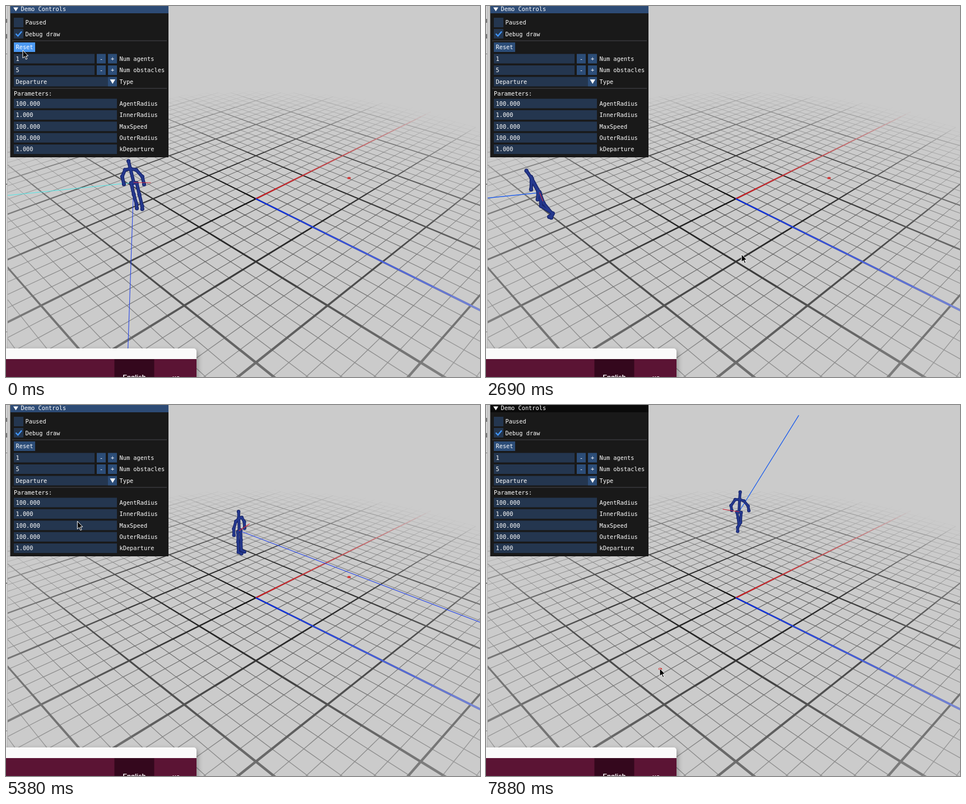
An HTML page with a canvas that plays this animation: 846x662 px, repeating every 8000 ms.

```html
<!DOCTYPE html>
<html lang="en">
<head>
<meta charset="utf-8">
<title>Steering demo</title>
<style>
  html, body { margin: 0; width: 100%; height: 100%; overflow: hidden; background: #cbcbcb; }
  canvas, svg { position: absolute; left: 0; top: 0; display: block; }
  text { font: 10.3px "DejaVu Sans Mono", monospace; fill: #fff; white-space: pre; }
  .site { font: bold 11.4px "Liberation Sans", Arial, sans-serif; }
  .field { fill: #24364f; }
  .btn { fill: #2c4d78; }
  .rule { fill: #48484f; }
</style>
</head>
<body>
<canvas id="floor" width="846" height="662"></canvas>
<canvas id="live" width="846" height="662"></canvas>
<svg width="846" height="662" viewBox="0 0 846 662">
  <defs>
    <filter id="shade" x="-10%" y="-50%" width="120%" height="200%">
      <feGaussianBlur stdDeviation="4"/>
    </filter>
  </defs>

  <rect width="2.5" height="662" fill="#d6d6d6"/>
  <rect x="2" width="1" height="662" fill="#b4b4b4"/>
  <path d="M0 23h2v7h-2zM0 50h2v8h-2zM0 85h2v1h-2zM0 317h2v2h-2zM0 581h2v1h-2z" fill="#777"/>

  <g id="panel">
    <rect x="7.5" y="0" width="282.5" height="270" fill="#191919"/>
    <rect id="title" x="8" y="0" width="282" height="13"/>
    <path d="M13 2.5h9l-4.5 7z" fill="#fff"/>
    <text x="26.5" y="9">Demo Controls</text>
    <rect class="rule" x="11" y="61.5" width="276" height="1"/>
    <rect class="rule" x="11" y="146.5" width="276" height="1"/>
    <rect class="field" x="14" y="21" width="17" height="17"/>
    <rect class="field" x="14" y="41" width="17" height="17"/>
    <path d="M17.5 49.5l3.8 4 6.7-8" fill="none" stroke="#4296fa" stroke-width="2.3"/>
    <text x="34.5" y="33">Paused</text>
    <text x="34.5" y="53.5">Debug draw</text>
    <rect id="reset" x="14" y="65" width="38" height="17"/>
    <text x="17.5" y="77">Reset</text>
    <text x="14" y="160">Parameters:</text>
  </g>

  <rect x="-10" y="614" width="353" height="60" rx="7" fill="#000" opacity=".28" filter="url(#shade)"/>
  <path d="M0 611h335a5 5 0 0 1 5 5v46H0z" fill="#fafafa"/>
  <rect y="630" width="340" height="32" fill="#5b1434"/>
  <rect x="193.5" y="630" width="71" height="32" fill="#34081d"/>
  <text class="site" x="229" y="665.5" text-anchor="middle">English</text>
  <text class="site" x="297" y="667">us</text>

  <path id="cursor" d="M0 0V14L3.3 11 5.6 16.2 7.8 15.2 5.5 10.3 9.5 10z" fill="#000" stroke="#fff" stroke-width="1"/>
</svg>
<script>
const $ = id => document.getElementById(id);
const LOOP = 8000;
const CLICK = 5830, RESPAWN = 5230, GONE = 4490;

// ---------- panel rows ----------
function add(tag, attrs, text) {
  const el = document.createElementNS('http://www.w3.org/2000/svg', tag);
  for (const k in attrs) el.setAttribute(k, attrs[k]);
  if (text) el.textContent = text;
  $('panel').append(el);
}
const box = (cls, x, y, width) => add('rect', { class: cls, x, y: y - 8.5, width, height: 17 });
const label = (x, y, s) => add('text', { x, y: y + 3.8 }, s);

function row(y, value, name, kind) {
  box('field', 14, y, kind === 'step' ? 144 : kind === 'combo' ? 168 : 184);
  if (kind === 'step') {
    box('btn', 162, y, 16);
    box('btn', 182, y, 16);
    label(167, y, '-');
    label(187, y, '+');
  }
  if (kind === 'combo') {
    box('btn', 182, y, 16);
    add('path', { d: `M185.5 ${y - 4}h9.5l-4.75 8z`, fill: '#fff' });
  }
  label(17.5, y, value);
  label(202.5, y, name);
}
row(94, '1', 'Num agents', 'step');
row(114.5, '5', 'Num obstacles', 'step');
row(135, 'Departure', 'Type', 'combo');
['AgentRadius', 'InnerRadius', 'MaxSpeed', 'OuterRadius', 'kDeparture'].forEach((name, i) =>
  row(174 + i * 20.4, /Inner|kDep/.test(name) ? '1.000' : '100.000', name));

// ---------- floor grid ----------
const BG = 203, RANGE = 5, STEP = 0.2;
const depth = (u, v) => 1 - 0.094 * (u + v);
const project = (u, v) => {
  const w = depth(u, v);
  return [446 + 91.8 * (u - v) / w, 344 + 45.6 * (u + v) / w];
};

function gridLine(g, k, swap, rgb, strength, width, power, from = -RANGE, to = RANGE) {
  const n = Math.round((to - from) / STEP);
  for (let i = 0; i < n; i++) {
    const a = from + i * STEP, b = a + STEP, m = a + STEP / 2;
    const fade = 1 - (Math.hypot(k, m) / RANGE) ** 1.2;
    if (fade <= 0.02) continue;
    const mix = c => Math.round(BG + (c - BG) * fade * strength);
    const at = x => swap ? project(k, x) : project(x, k);
    g.strokeStyle = `rgb(${rgb.map(mix)})`;
    g.lineWidth = width / depth(k, m) ** power;
    g.beginPath();
    g.moveTo(...at(a));
    g.lineTo(...at(b + 0.004));
    g.stroke();
  }
}

function drawFloor() {
  const g = $('floor').getContext('2d');
  g.fillStyle = `rgb(${BG},${BG},${BG})`;
  g.fillRect(0, 0, 846, 662);
  for (const major of [false, true]) {
    for (let i = -25; i <= 25; i++) {
      if ((i % 5 === 0) !== major) continue;
      for (const swap of [false, true]) {
        if (major) gridLine(g, i / 5, swap, [10, 10, 10], 1, 2.2, 1.5);
        else gridLine(g, i / 5, swap, [50, 50, 50], 0.85, 1, 0.7);
      }
    }
  }
  gridLine(g, 0, true, [205, 30, 35], 1, 2.3, 1.2, -RANGE, 0);
  gridLine(g, 0, false, [10, 45, 225], 1, 2.3, 1.2, 0, RANGE);
}

// ---------- motion ----------
const lerp = (a, b, f) => a + (b - a) * f;
const clamp = f => Math.min(1, Math.max(0, f));
const smooth = f => (f = clamp(f), f * f * (3 - 2 * f));

// Keys are [time, x, y].
function track(keys, t) {
  let i = 0;
  while (i < keys.length - 2 && t >= keys[i + 1][0]) i++;
  const [a, b] = [keys[i], keys[i + 1]];
  const f = clamp((t - a[0]) / (b[0] - a[0]));
  return [lerp(a[1], b[1], f), lerp(a[2], b[2], f)];
}

const MOUSE = [
  [0, 30, 79], [750, 228, 304], [1950, 312, 437], [2850, 528, 446], [3290, 483, 451],
  [4340, 75, 76], [4490, 75, 76], [4930, 36, 76], [5230, 36, 76], [5680, 310, 470]
];

// Each run starts facing `from` and turns to face `to`, as angles on the floor.
const RUNS = [
  { spawn: -276, turn: -276, from: 0.88, to: 2.94,
    path: [[0, 228, 315], [750, 206, 317], [1950, 140, 327], [4490, -48, 353]] },
  { spawn: RESPAWN, turn: CLICK, from: 0.65, to: -1.27,
    path: [[5230, 414, 225], [5970, 425, 221], [7880, 451.5, 190.5]] }
];

// ---------- agent ----------
const g = $('live').getContext('2d');

function line([x, y], [dx, dy], color) {
  g.strokeStyle = color;
  g.lineWidth = 1.1;
  g.beginPath();
  g.moveTo(x, y);
  g.lineTo(x + dx, y + dy);
  g.stroke();
}

// Floor directions are squashed to half height; far ones look shorter.
const onFloor = (angle, len) => [Math.cos(angle) * len, Math.sin(angle) * len / 2];
const ray = angle => onFloor(angle, 475 + 120 * Math.sin(angle));

// A limb side (-1 or 1) as points of [forward, sideways, up] around the hip.
function leg(side, phase, run) {
  const s = side * Math.sin(phase), c = side * Math.cos(phase);
  const thigh = run * (0.15 + 0.5 * s);
  const shin = thigh - run * (0.75 - 0.35 * s + 0.5 * c);
  const r = side * 5;
  const knee = [21 * Math.sin(thigh), r, -21 * Math.cos(thigh)];
  const ankle = [knee[0] + 21 * Math.sin(shin), r, knee[2] - 21 * Math.cos(shin)];
  const toe = [ankle[0] + 8 * Math.cos(shin), r, ankle[2] + 8 * Math.sin(shin) - 1];
  return [[0, 0, 0], [0, r, -1], knee, ankle, toe];
}
function arm(side, phase, run, neck) {
  const swing = -7 * run * side * Math.sin(phase);
  return [neck, [neck[0], side * 10, 23], [neck[0] + swing, side * 18, 11],
    [neck[0] + swing + 6 * run, side * 18, -2]];
}

function drawBody([x, y], angle, phase, run) {
  const size = 1 + (y - 315) * 0.00145;
  const tilt = (x - 446) * 0.0011;
  const [fx, fy] = onFloor(angle, size), [rx, ry] = onFloor(angle - Math.PI / 2, size);
  const place = ([f, r, u]) =>
    [x + f * fx + r * rx + u * tilt * size, y + f * fy + r * ry - u * size];

  const neck = [4 * run, 0, 25], head = [8 * run, 0, 39];
  const chains = [[[0, 0, 0], neck, head]];
  for (const side of [-1, 1]) chains.push(leg(side, phase, run), arm(side, phase, run, neck));

  g.lineCap = g.lineJoin = 'round';
  for (const [color, width] of [['#17246a', 6 * size], ['#25398f', 3.4 * size]]) {
    g.strokeStyle = g.fillStyle = color;
    g.lineWidth = width;
    for (const chain of chains) {
      const points = chain.map(place);
      g.beginPath();
      points.forEach(p => g.lineTo(...p));
      g.stroke();
      for (const p of points) {
        g.beginPath();
        g.arc(...p, width / 2 + 0.6, 0, 7);
        g.fill();
      }
    }
  }
}

function drawAgent(t) {
  const { spawn, turn, from, to, path } = RUNS[t < GONE ? 0 : 1];
  const hip = track(path, t);
  const angle = lerp(from, to, smooth((t - turn) / 700));
  const run = clamp((t - spawn - 150) / 600);
  if (t >= turn) line(hip, ray(to), '#4fe8e8');
  line(hip, ray(angle), '#2746e8');
  drawBody(hip, angle, 2 * Math.PI * (t / 1000 - 0.5), run);
  line(hip, onFloor(angle - Math.PI / 2, 30), '#d8283a');
}

// The picture advances in steps of 150 ms, restarting at each anchor.
function stepped(t) {
  const start = [7880, 7440, 6260, 5970, 4930, 3290, 0].find(a => t >= a);
  return start + Math.floor((t - start) / 150) * 150;
}

function draw(now) {
  const t = stepped(now % LOOP);
  g.clearRect(0, 0, 846, 662);
  g.save();
  g.beginPath();
  g.rect(3, 0, 843, 662);
  g.clip();
  g.fillStyle = '#d03c3c';
  g.beginPath();
  g.ellipse(...(t < CLICK ? [612.3, 307] : [311, 471]), 3.2, 2, 0, 0, 7);
  g.fill();
  if (t < GONE || t >= RESPAWN) drawAgent(t);
  g.restore();

  const [mx, my] = track(MOUSE, t);
  const hover = mx >= 14 && mx <= 52 && my >= 65 && my <= 82;
  $('cursor').setAttribute('transform', `translate(${mx} ${my})`);
  $('reset').setAttribute('fill', hover ? '#4b98f2' : '#2c4d78');
  $('title').setAttribute('fill', t < CLICK ? '#2d4b75' : '#0a0a0a');
}

drawFloor();
let begin;
function tick(now) {
  begin ??= now;
  draw(Math.max(0, now - begin));
  requestAnimationFrame(tick);
}
draw(0);
requestAnimationFrame(tick);
</script>
</body>
</html>
```
